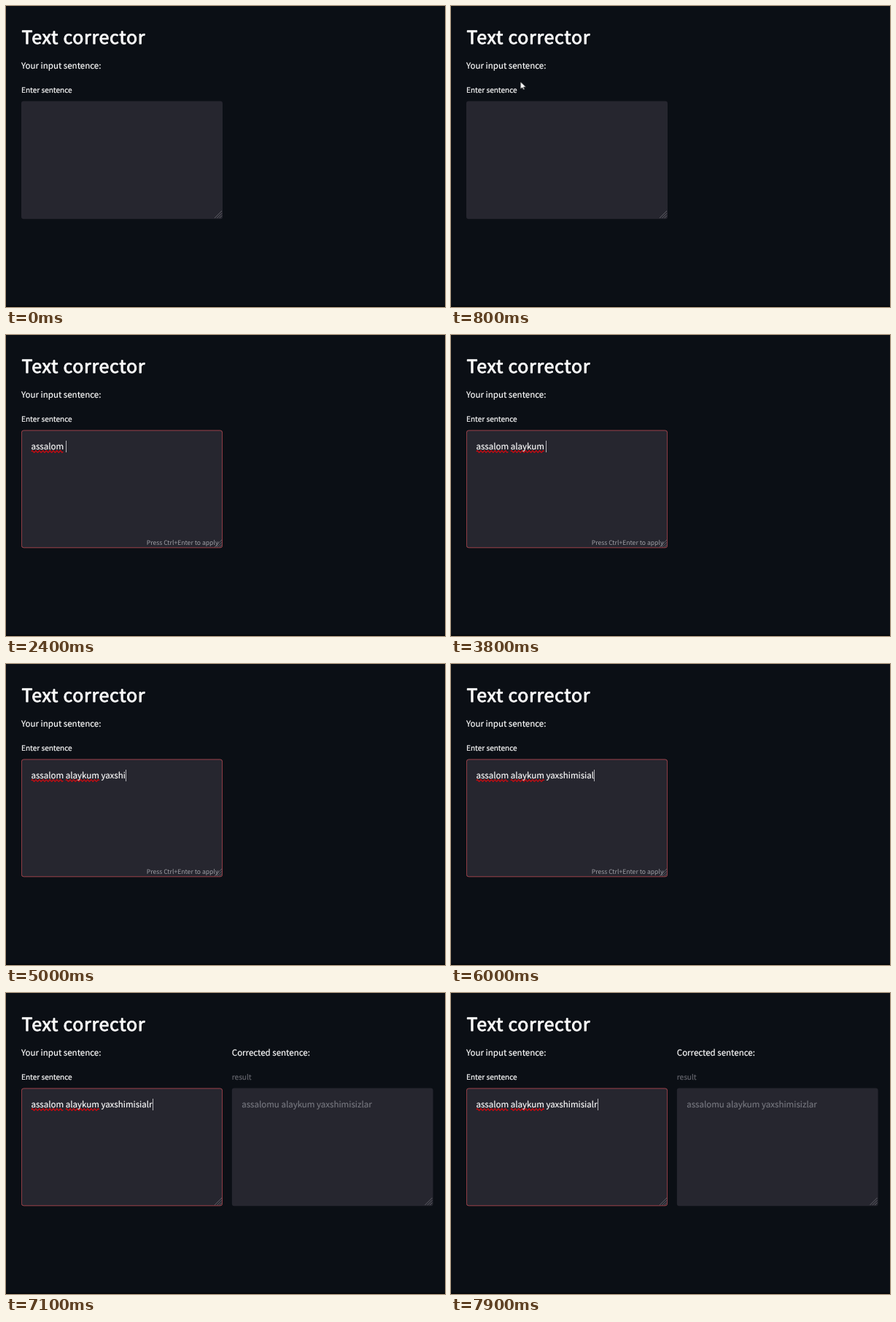
An HTML page for the animation above (8 s loop, 602x413 px).

```html
<!DOCTYPE html>
<html lang="en">
<head>
<meta charset="utf-8">
<title>Text corrector</title>
<style>
  html, body { margin: 0; width: 100%; height: 100%; overflow: hidden; background: #0b0f15; }
  svg { display: block; width: 602px; height: 413px; }
  text {
    font-family: "Noto Sans CJK JP", "Noto Sans CJK SC", "Noto Sans CJK KR", "Noto Sans CJK", "Open Sans", sans-serif;
    font-size: 11.52px; fill: #fafafa; stroke: #fafafa; stroke-width: .2px;
    white-space: pre; text-rendering: geometricPrecision;
  }
  .title { font-size: 24.9px; letter-spacing: .72px; stroke-width: .95px; stroke-linejoin: round; }
  .label { font-size: 10.07px; }
  .dim { fill: #63646b; stroke: #63646b; }
  .value { fill: #74757d; stroke: #74757d; }
  .tip { font-size: 8.62px; fill: #a0a0a6; stroke: none; }
  .box { fill: #26262f; }
  .ring { fill: none; stroke: #b8474e; stroke-width: .8; }
  .grip { fill: none; stroke: #77777d; stroke-width: .7; }
  .wave { fill: none; stroke: #e0060c; stroke-width: 1.2; }

  .ring, .tip, .wave, .result, .pointer, .ripple { animation: 8s linear infinite; }
  .ring { animation-name: focus; }
  .tip { animation-name: tip; animation-timing-function: step-end; }
  .first { animation-name: first; animation-timing-function: step-end; }
  .second { animation-name: second; animation-timing-function: step-end; }
  .result { animation-name: result; animation-timing-function: step-end; }
  .pointer { animation-name: pointer; }
  .ripple { animation-name: ripple; }

  @keyframes focus { 0%, 12.4% { opacity: 0 } 14.9% { opacity: .75 } 17.5%, 100% { opacity: 1 } }
  @keyframes tip { 0% { opacity: 0 } 17.45% { opacity: 1 } 83.7% { opacity: 0 } }
  @keyframes first { 0% { opacity: 0 } 29.9% { opacity: 1 } }
  @keyframes second { 0% { opacity: 0 } 46.2% { opacity: 1 } }
  @keyframes result { 0% { opacity: 0 } 88.7% { opacity: 1 } }
  @keyframes pointer {
    0%, 4.95% { transform: translate(0, 35px); opacity: 0 }
    4.96%, 7.4% { transform: translate(0, 35px); opacity: 1; animation-timing-function: ease-in-out }
    12.4%, 14.8% { transform: translate(177px, 163px); opacity: 1 }
    14.81%, 100% { transform: translate(177px, 163px); opacity: 0 }
  }
  @keyframes ripple {
    0%, 12.4% { opacity: 0 }
    12.5% { opacity: .3 }
    14.8% { opacity: .04 }
    17.5%, 100% { opacity: 0 }
  }
</style>
</head>
<body>
<svg viewBox="0 0 602 413">
  <defs>
    <path id="grip" class="grip" d="M0 10L10 0M3.3 10L10 3.3M6.6 10L10 6.6"/>
  </defs>
  <rect width="602" height="413" fill="#0b0f15"/>
  <rect y="411.5" width="602" height="1.5" fill="#050609"/>

  <text class="title" x="21.5" y="52.4">Text corrector</text>
  <text x="21" y="86.4">Your input sentence:</text>
  <text class="label" x="21" y="119.3">Enter sentence</text>
  <rect class="box" x="21" y="130.6" width="276" height="161.6" rx="3.2"/>
  <circle class="ripple" cx="177" cy="163" r="12" fill="none" stroke="#d01830" stroke-width="10"/>
  <rect class="ring" x="21.4" y="131" width="275.2" height="160.8" rx="3"/>
  <use href="#grip" x="286" y="281"/>
  <text class="tip" x="192.7" y="287.6">Press Ctrl+Enter to apply</text>

  <path class="wave first"/>
  <path class="wave second"/>
  <text id="typed" x="34.5" y="157.2"></text>
  <rect id="caret" y="145" width="1" height="16" fill="#b4b4b9"/>

  <g class="result">
    <text x="309.8" y="86.4">Corrected sentence:</text>
    <text class="label dim" x="309.8" y="119.3">result</text>
    <rect class="box" x="309.8" y="130.6" width="275.8" height="161.6" rx="3.2"/>
    <use href="#grip" x="574.5" y="281"/>
    <text class="value" x="323.2" y="157.2">assalomu alaykum yaxshimisizlar</text>
  </g>

  <path class="pointer" d="M0 0V10L2.4 7.8L4 11L5.5 10.3L4 7.2H7.4Z" fill="#fff" stroke="#111" stroke-width=".5"/>
</svg>
<script>
  const LOOP = 8000, LEFT = 34.5;
  const phrase = "assalom alaykum yaxshimisialr";
  // time of each key press, in tenths of a second
  const keys = [13, 14, 16, 18, 19, 21, 23, 24, 26, 28, 30, 33, 33, 34, 36, 37,
                41, 43, 45, 46, 48, 50, 52, 53, 55, 56, 57, 58, 61];
  const typed = document.getElementById("typed");
  const caret = document.getElementById("caret");

  function wave(name, from, to) {
    let d = `M${from} 159.9`;
    for (let x = from, up = true; x < to - 1; x += 2.4, up = !up)
      d += `q1.2 ${up ? -2.6 : 2.6} 2.4 0`;
    document.querySelector(name).setAttribute("d", d);
  }
  wave(".first", 35, 79);
  wave(".second", 82, 127.5);

  function caretOn(t) {
    if (t < 1000) return false;
    if (t < 6300) return true;
    return t >= 6800 && t < 7400 || t >= 7900;
  }

  let start, shown = -1;
  function draw(now) {
    start ??= now;
    const t = (now - start) % LOOP + 5;
    const count = keys.filter(k => k * 100 <= t).length;
    if (count !== shown) {
      shown = count;
      typed.textContent = phrase.slice(0, count);
      const width = count ? typed.getComputedTextLength() : 0;
      caret.setAttribute("x", Math.round(LEFT + width));
    }
    caret.style.opacity = caretOn(t) ? 1 : 0;
    requestAnimationFrame(draw);
  }
  requestAnimationFrame(draw);
</script>
</body>
</html>
```
